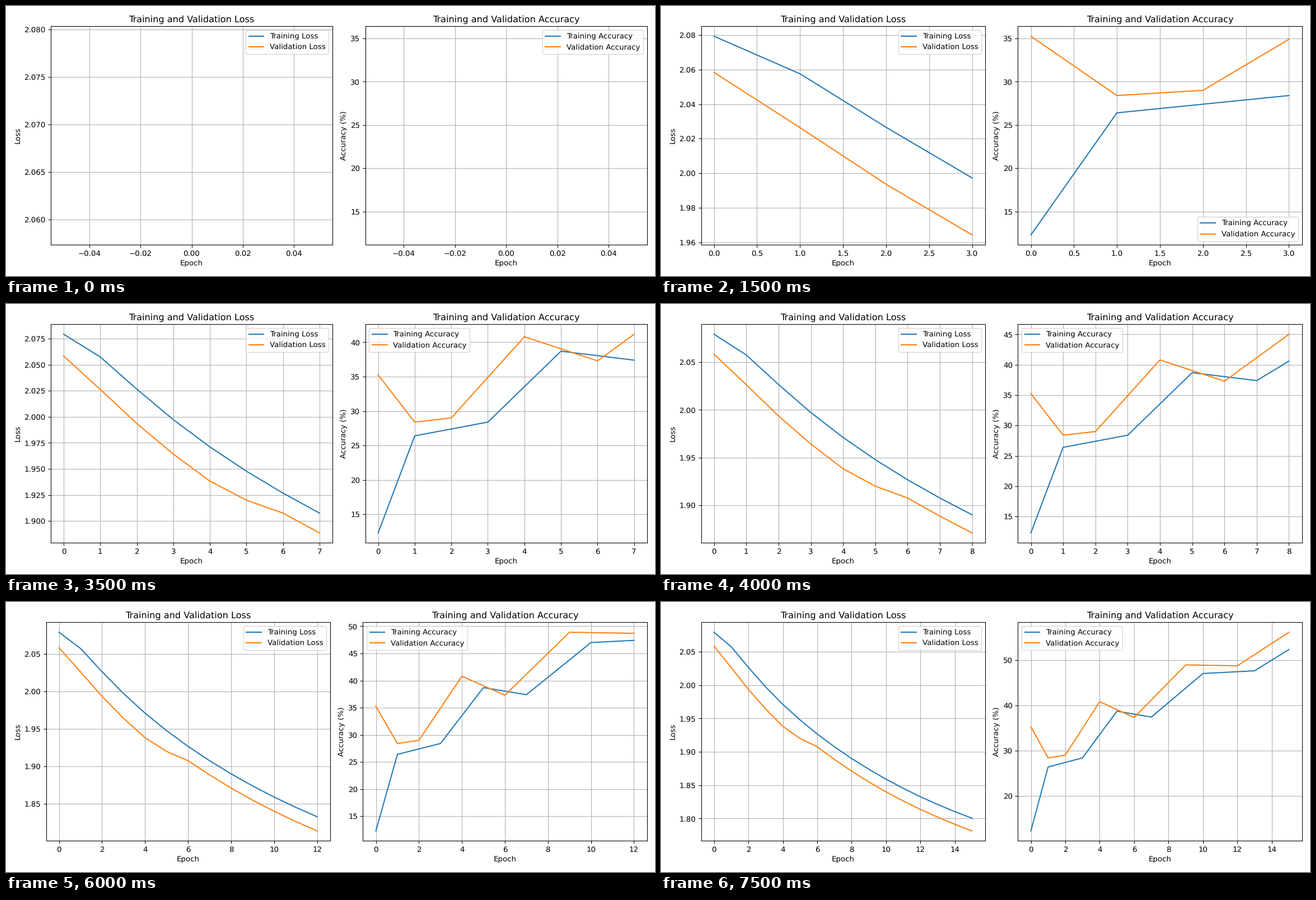
Write a matplotlib script that moves like this. It is 1159 px wide and 483 px high and loops after 8000 ms.

```python
import matplotlib.pyplot as plt
import numpy as np
from matplotlib.animation import FuncAnimation

W, H = 1159, 483
DPI = W / 12
EPS = 1e-6  # keeps the pixel size from truncating downwards
EPOCHS = 16
AXES_TOP, AXES_BOTTOM = 36.3, 427.3  # pixels from the upper edge

epochs = np.arange(EPOCHS)


def through(*points):
    """Straight segments through (epoch, value) turning points."""
    xs, ys = zip(*points)
    return np.interp(epochs, xs, ys)


# Exponential decay with a slow start; validation runs below it,
# by a wider gap during the first five epochs.
train_loss = (1.6845 + 0.3948 * np.exp(-epochs / 12.25)
              + 0.025 * epochs * np.exp(-epochs))
val_loss = train_loss - 0.019 - 0.014 * np.exp(-((epochs - 2.8) / 2.5) ** 6)

train_acc = through((0, 12.3), (1, 26.4), (3, 28.4), (5, 38.7),
                    (7, 37.4), (10, 47), (13, 47.6), (15, 52.3))
val_acc = through((0, 35.25), (1, 28.4), (2, 29), (4, 40.8),
                  (6, 37.3), (9, 48.9), (12, 48.7), (15, 56.1))

plt.rcParams["font.family"] = "DejaVu Sans"
plt.rcParams["text.hinting"] = "no_hinting"
fig, (ax_loss, ax_acc) = plt.subplots(
    1, 2, figsize=((W + EPS) / DPI, (H + EPS) / DPI), dpi=DPI)


def draw_panel(ax, train, val, name, ylabel, n):
    ax.clear()
    ax.plot(epochs[:n], train[:n], label=f"Training {name}")
    ax.plot(epochs[:n], val[:n], label=f"Validation {name}")
    ax.set_title(f"Training and Validation {name}")
    ax.set_xlabel("Epoch")
    ax.set_ylabel(ylabel)
    ax.legend(labelspacing=0.54)
    ax.grid(True)


def update(epoch):
    n = epoch + 1
    draw_panel(ax_loss, train_loss, val_loss, "Loss", "Loss", n)
    draw_panel(ax_acc, train_acc, val_acc, "Accuracy", "Accuracy (%)", n)
    fig.tight_layout()
    fig.subplots_adjust(top=1 - AXES_TOP / H, bottom=1 - AXES_BOTTOM / H)
    return []


anim = FuncAnimation(fig, update, frames=EPOCHS, interval=500,
                     repeat=True, repeat_delay=0)
plt.show()
```
